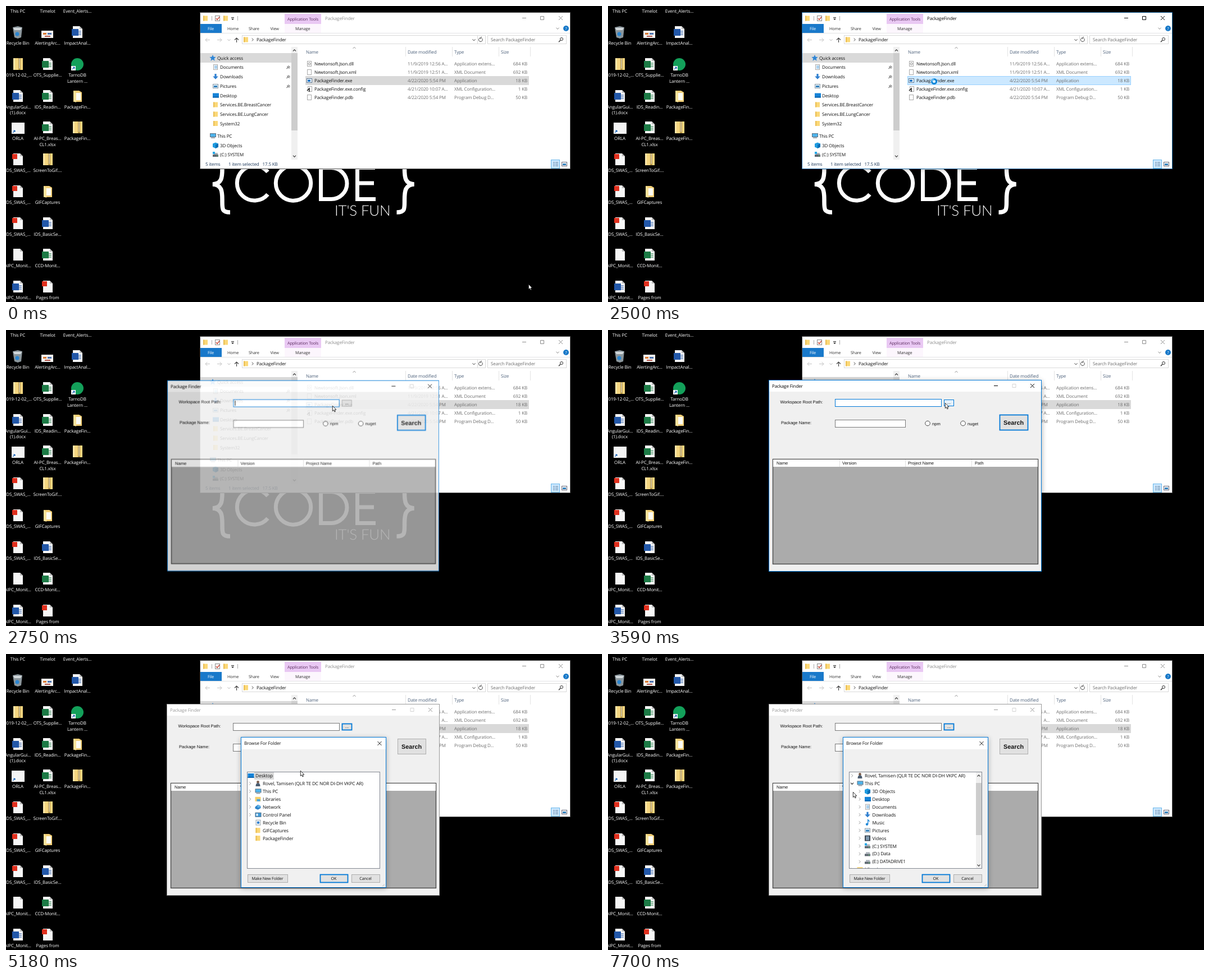
These frames come from a looping animation (1061x528 px, 8000 ms). An HTML page:

```html
<!DOCTYPE html>
<html lang="en">
<head>
<meta charset="utf-8">
<title>Package Finder</title>
<style>
html, body { margin: 0; width: 100%; height: 100%; overflow: hidden; background: #000; }
svg { display: block; }
text { font: 8px "Open Sans", "Noto Sans", sans-serif; letter-spacing: -.12px; white-space: pre; text-rendering: geometricPrecision; }
.rib { font-size: 7.3px; letter-spacing: -.15px; }
.tree { font-size: 8.25px; }
.ms { font: 7.6px "Liberation Sans", Arial, sans-serif; letter-spacing: 0; }
.btn { font-size: 7.2px; }
.big { font: 700 10.8px "Liberation Sans", Arial, sans-serif; letter-spacing: 0; }
.fun { font: 300 26px Lato, sans-serif; letter-spacing: -.2px; }
.mid { text-anchor: middle; }
.end { text-anchor: end; }
.shade { filter: blur(5px); }
.finder { transform-origin: 529px 260px; }
.dialog { transform-origin: 547px 283px; }
.spin { transform-box: fill-box; transform-origin: center; animation: spin 1s steps(14) infinite; }
@keyframes spin { to { transform: rotate(360deg); } }
</style>
</head>
<body>
<svg id="stage" width="1061" height="528" viewBox="0 0 1061 528"></svg>
<script>
const LOOP = 8000, BLUE = '#0078d7';

// Drawing helpers, all returning SVG markup
const rect = (x, y, w, h, fill, more = '') =>
  `<rect x="${x}" y="${y}" width="${w}" height="${h}" fill="${fill}" ${more}/>`;
const box = (x, y, w, h, fill, stroke, more = '') =>
  rect(x + .5, y + .5, w - 1, h - 1, fill, `stroke="${stroke}" ${more}`);
const line = (d, stroke = '#444', w = 1, more = '') =>
  `<path d="${d}" fill="none" stroke="${stroke}" stroke-width="${w}" ${more}/>`;
const shape = (d, fill) => `<path d="${d}" fill="${fill}"/>`;
const disc = (x, y, r, fill, more = '') => `<circle cx="${x}" cy="${y}" r="${r}" fill="${fill}" ${more}/>`;
const text = (x, y, s, fill = '#111', cls = '') =>
  `<text x="${x}" y="${y + 3}" fill="${fill}" class="${cls}">${s}</text>`;
const group = (cls, ...parts) => `<g class="${cls}">${parts.join('')}</g>`;
const chevron = (x, y, dir, color = '#444', w = 1) => line({
  up: `M${x - 2.5} ${y + 1.5}l2.5 -2.7 2.5 2.7`,
  down: `M${x - 2.5} ${y - 1.3}l2.5 2.7 2.5 -2.7`,
  right: `M${x - 1.3} ${y - 2.5}l2.7 2.5 -2.7 2.5`
}[dir], color, w);

// Small icons, centred on x,y
const mini = {
  folder: (x, y) => rect(x - 4, y - 4.5, 8, 9, '#fbd878') + rect(x - 4, y - 4.5, 2, 9, '#e9bd52'),
  page: (x, y) => box(x - 4, y - 5, 8, 10, '#fff', '#a9a9a9'),
  doc: (x, y) => mini.page(x, y) + line(`M${x - 2} ${y - 2}h5m-5 2h5m-5 2h5`, '#4b9bd8', .9),
  down: (x, y) => shape(`M${x - 1.6} ${y - 5}h3.2v4.5h3.2l-4.8 5.3 -4.8 -5.3h3.2z`, '#2f7fd0'),
  picture: (x, y) => box(x - 5, y - 4, 10, 8, '#dff0fb', '#8a98a5') + rect(x - 3, y - 1, 6, 3, '#2e7cb8'),
  desktop: (x, y) => rect(x - 5, y - 4, 11, 8, '#1583d8') + rect(x - 5, y + 2, 11, 2, '#0f67b0'),
  pc: (x, y) => box(x - 5, y - 4.5, 11, 7, '#4fb4ec', '#5b6f80') + rect(x - 3, y + 3, 7, 1.5, '#8a98a5'),
  cube: (x, y) => shape(`M${x} ${y - 5}l5 2v6l-5 2.5 -5 -2.5v-6z`, '#1e9be0') + shape(`M${x} ${y - 1}l5 -2v6l-5 2.5z`, '#0a6fb5'),
  drive: (x, y) => rect(x - 5, y, 10, 4, '#5d6670') + rect(x - 3, y - 3, 7, 3, '#aab2ba') + rect(x + 2, y + 1.5, 2, 1, '#6fe07a'),
  system: (x, y) => mini.drive(x, y) + rect(x - 5, y - 5, 4, 4, '#24a8e8'),
  music: (x, y) => disc(x - 1, y + 3, 2.2, '#1e88d8') + line(`M${x + .7} ${y + 3}v-8l3 3`, '#1e88d8', 1.4),
  video: (x, y) => rect(x - 5, y - 5, 10, 10, '#3c4650') + rect(x - 3, y - 3.5, 6, 7, '#7e97ad'),
  person: (x, y) => disc(x, y - 2.5, 2.4, '#7a5c4a') + shape(`M${x - 4} ${y + 5}q0 -6 4 -6t4 6z`, '#4c5d70'),
  library: (x, y) => rect(x - 5, y - 4, 10, 8, '#f4cf6c') + rect(x - 2, y, 6, 4, '#4ca5dc'),
  network: (x, y) => shape(`M${x - 5} ${y}l5 -4 5 3v3l-5 3 -5 -2z`, '#2c83c9') + rect(x - 1, y - 3, 5, 4, '#63b4e8'),
  control: (x, y) => box(x - 5, y - 4, 11, 8, '#3c9ad9', '#4c6b85') + rect(x - 3, y - 2, 3, 4, '#eaf6ff'),
  bin: (x, y) => box(x - 4, y - 5, 9, 10, '#eef3f6', '#9aa7b0') + disc(x + .5, y, 2.3, '#2f7fd0'),
  app: (x, y) => box(x - 5, y - 4, 10, 8, '#fff', '#5b7896') + rect(x - 3, y - 1.5, 5, 3.5, '#1b74c5'),
  dll: (x, y) => mini.page(x, y) + disc(x, y, 2, 'none', 'stroke="#888"'),
  config: (x, y) => mini.page(x + 1, y) + line(`M${x - 4} ${y + 3}l4 -4v6`, '#222', 1.5)
};

// Desktop icons, centred on x,y
const sheet = (x, y) => shape(`M${x - 8} ${y - 11}h12l5 5v16h-17z`, '#f6f6f6') + shape(`M${x + 4} ${y - 11}l5 5h-5z`, '#bdbdbd');
const office = color => (x, y) => sheet(x, y) + line(`M${x + 2} ${y - 2}h5m-5 3h5m-5 3h5`, color, 1) + rect(x - 10, y - 6, 12, 12, color);
const shortcut = (x, y) => rect(x - 11, y + 3, 8, 8, '#fff') + line(`M${x - 9} ${y + 9}l4 -4m-3 0h3v3`, '#1b63b5', 1.2);
const icons = {
  none: () => '',
  word: office('#2257a8'),
  excel: office('#1c7a45'),
  pdf: (x, y) => sheet(x, y) + rect(x - 10, y - 10, 9, 9, '#e0301e'),
  blank: sheet,
  folder: (x, y) => shape(`M${x - 7} ${y - 10}h10l5 3v17h-15z`, '#f2cf77') + rect(x - 2, y - 6, 8, 13, '#fbfbf4') + shape(`M${x - 7} ${y - 10}l5 4v17l-5 -2z`, '#fbe29a'),
  zip: (x, y) => rect(x - 8, y - 11, 17, 21, '#f5d680') + rect(x - 8, y - 11, 3, 21, '#fbe6a8') + rect(x + 1, y - 11, 4, 21, '#b99a4c') + line(`M${x + 3} ${y - 10}v18`, '#eee', 2, 'stroke-dasharray="1 1"'),
  bin: (x, y) => shape(`M${x - 9} ${y - 9}l9 -2 8 2 -2 18 -6 2 -6 -2z`, '#8b969c') + shape(`M${x - 8} ${y - 8}h15l-2 4h-11z`, '#d3d9dc') + disc(x - 1, y + 3, 3.5, '#2a85d0'),
  thumb: (x, y) => rect(x - 11, y - 3, 21, 13, '#f5f3f0') + rect(x - 8, y + 1, 6, 3, '#d9772f') + rect(x, y + 1, 7, 3, '#4a72b0') + rect(x - 5, y + 6, 10, 2, '#b05248'),
  tile: (x, y) => rect(x - 11, y - 9, 23, 20, '#f4f4f4') + shortcut(x, y),
  disc: (x, y) => disc(x, y, 11, '#13a05a') + shortcut(x, y)
};

const columns = [
  [21, 'none:This PC', 'bin:Recycle Bin', 'zip:2019-12-02_...', 'word:AngularGui...|(1).docx', 'tile:ORLA', 'pdf:IDS_SWAS_...',
    'pdf:IDS_SWAS_...', 'pdf:IDS_SWAS_...', 'blank:AIPC_Monit...', 'word:AIPC_Monit...'],
  [74, 'none:Timelot', 'thumb:AlertingArc...', 'excel:OTS_Supplie...', 'excel:IDS_Readin...', 'excel:AI-PC_Breas...|CL1.xlsx', 'zip:ScreenToGif....',
    'folder:GIFCaptures', 'word:IDS_BasicSe...', 'excel:CCD-Monit...', 'pdf:Pages from'],
  [127, 'none:Event_Alerts...', 'word:ImpactAnal...', 'disc:TarnoDB|Lantern ...', 'folder:PackageFin...', 'zip:PackageFin...']
];
const desktop = columns.map(([x, ...items]) => items.map((item, i) => {
  const [kind, label] = item.split(':'), y = 9.3 + i * 56.75;
  return icons[kind](x, Math.round(y - 19)) +
    label.split('|').map((s, n) => text(x, y + n * 10.8, s, '#fff', 'mid')).join('');
}).join('')).join('');

const brace = 'M399 267C384 267 385 275 385 290C385 306 384 317 368 318C384 319 385 330 385 346C385 362 384 368 399 368';
const wallpaper = group('wall',
  line(brace, '#fff', 7.5),
  line(brace, '#fff', 7.5, 'transform="translate(1094.5 0) scale(-1 1)"'),
  line('M466 296A31 31 0 1 0 466 336', '#fff', 7),
  disc(511.5, 316, 31.2, 'none', 'stroke="#fff" stroke-width="7"'),
  line('M560.5 288.5H579A28 28 0 0 1 579 344.5H560.5Z', '#fff', 7),
  line('M657 288.5H625.5V344.5H658M625.5 316H655', '#fff', 7),
  text(585, 371, "IT'S FUN", '#fff', 'fun'));

const winButtons = (xs, y, cls, midColor) =>
  line(`M${xs[0] - 3.5} ${y}h7`, '#8c8c8c', 1, `class="${cls}"`) +
  line(`M${xs[1] - 3} ${y - 3}h6v6h-6z`, midColor || '#8c8c8c', 1, midColor ? '' : `class="${cls}"`) +
  line(`M${xs[2] - 3.5} ${y - 3.5}l7 7m0 -7l-7 7`, '#8c8c8c', 1, `class="${cls}"`);

// File explorer
const nav = [[109, 'doc', 'Documents'], [126, 'down', 'Downloads'], [143, 'picture', 'Pictures'], [159.5, 'desktop', 'Desktop'],
  [176, 'folder', 'Services.BE.BreastCancer'], [193, 'folder', 'Services.BE.LungCancer'], [209.5, 'folder', 'System32'],
  [248.5, 'cube', '3D Objects'], [265, 'system', '(C:) SYSTEM']];
const files = [['dll', 'Newtonsoft.Json.dll', '11/9/2019 12:56 A...', 'Application extens...', 684],
  ['page', 'Newtonsoft.Json.xml', '11/9/2019 12:51 A...', 'XML Document', 692],
  ['app', 'PackageFinder.exe', '4/22/2020 5:54 PM', 'Application', 18],
  ['config', 'PackageFinder.exe.config', '4/21/2020 10:07 A...', 'XML Configuration...', 1],
  ['page', 'PackageFinder.pdb', '4/22/2020 5:54 PM', 'Program Debug D...', 50]];
const pin = y => line(`M499.5 ${y + 3}l2.5 -2.5m-1.5 -2l4 4m-2 -5l3 3`, '#777', 1.2);

const explorer = group('explorer',
  rect(345, 13, 660, 278, '#000', 'class="shade expShade"'),
  box(345, 11, 660, 280, '#fff', '#4a4a4a', 'class="expEdge"'),
  mini.folder(355, 22), mini.folder(391, 22),
  line('M366.5 18v8M412.5 18v8', '#aaa'),
  box(372, 17, 9, 10, '#fff', '#888'), line('M374 22l2 2.5 4 -5', '#c8402f', 1.3),
  line('M401 20.5h5', '#222'), shape('M401 22.5h5l-2.5 2.5z', '#222'),
  rect(496, 14, 65, 18, '#e9c8f3'), rect(496, 32, 65, 16, '#fcf6fd'),
  text(501, 23, 'Application Tools', '#5c2d60', 'rib'),
  text(568, 22, 'PackageFinder', '#8c8c8c', 'expTitle'),
  winButtons([922.5, 954.5, 987.5], 21.5, 'expBtn'),
  rect(346, 32, 38, 16, '#1979ca'), text(359, 40, 'File', '#fff', 'rib'),
  ...[[394, 'Home'], [432, 'Share'], [470.5, 'View'], [515, 'Manage']].map(([x, s]) => text(x, 40, s, '#333', 'rib')),
  line('M346 48.5H1004', '#e2e3e4'),
  chevron(982, 40, 'down', '#888'), disc(997, 40, 5, '#1477c8'), text(997, 40, '?', '#fff', 'rib mid'),
  line('M363 60.5h-8m3.5 -3.5l-3.5 3.5 3.5 3.5M376 60.5h8m-3.5 -3.5l3.5 3.5 -3.5 3.5', '#c4c4c4'),
  chevron(397, 60.5, 'down', '#bbb'), line('M410.5 65v-8m-3.5 3.5l3.5 -3.5 3.5 3.5', '#444', 1.2),
  box(420, 52, 434, 16, '#fff', '#d9d9d9'), mini.folder(427, 60), chevron(439, 60, 'right', '#555'),
  text(446, 60, 'PackageFinder'), chevron(833, 60.5, 'down'), line('M839.5 53v14', '#d9d9d9'),
  line('M847.5 58a3.4 3.4 0 1 1 -3 -1.2m1.5 -2.2v3h-3', '#444'),
  box(857, 52, 141, 16, '#fff', '#d9d9d9'), text(863, 60, 'Search PackageFinder', '#6d6d6d'),
  disc(989, 59, 2.5, 'none', 'stroke="#333"'), line('M987 61l-3 3.2', '#333', 1.3),

  rect(346, 84, 162, 17, '#d9d9d9'),
  shape('M368 87l1.6 3.8 4 .3 -3 2.6 1 4 -3.6 -2.2 -3.6 2.2 1 -4 -3 -2.6 4 -.3z', '#2f86d6'),
  text(376, 92.5, 'Quick access'),
  ...nav.map(([y, kind, s]) => mini[kind](373, y) + text(381, y, s)),
  pin(109), pin(126), pin(143),
  mini.pc(368, 231.5), text(376, 231.5, 'This PC'),
  rect(508, 73, 11, 201, '#f0f0f0'), rect(508, 84, 11, 138, '#cdcdcd'),
  chevron(513.5, 79, 'up', '#444', 1.2), chevron(513.5, 268, 'down', '#444', 1.2),

  line('M711.5 73v17M794.5 73v17M877.5 73v17M933.5 73v17', '#e3e3e3'), chevron(620, 74.5, 'up', '#888', .9),
  ...[[534, 'Name'], [715, 'Date modified'], [798, 'Type'], [881, 'Size']].map(([x, s]) => text(x, 82, s, '#4c607a')),
  box(533, 125, 398, 16, '#d9d9d9', '#d9d9d9', 'class="row"'),
  ...files.map(([kind, name, date, type, size], i) => {
    const y = 103 + i * 15;
    return mini[kind](540, y) + text(549, y, name) + text(715, y, date, '#6d6d6d') +
      text(798, y, type, '#6d6d6d') + text(928, y, size + ' KB', '#6d6d6d', 'end');
  }),
  text(355, 282, '5 items', '#1e395b'), text(396, 282, '1 item selected', '#1e395b'), text(456.5, 282, '17.5 KB', '#1e395b'),
  box(970, 274, 16, 16, '#cce8ff', '#66b5ea'), line('M974 279h3m1 0h5m-9 3h3m1 0h5m-9 3h3m1 0h5', '#5b7896'),
  box(989, 278, 10, 8, '#fff', '#667'), rect(991, 281, 6, 3, '#2e7cb8'));

// Package Finder window
const field = (x, y, w, cls = '') => box(x, y, w, 14, '#fff', '#7a7a7a', `class="${cls}"`);
const radio = (x, s) => disc(x, 166.5, 4.3, '#fff', 'stroke="#444"') + text(x + 8, 166.5, s, '#111', 'ms');
const finder = group('finder',
  rect(286, 91, 486, 340, '#000', 'class="shade finShade"'),
  box(286, 89, 486, 342, '#f0f0f0', BLUE, 'class="finEdge"'),
  rect(287, 90, 484, 20, '#fff'),
  text(292, 100, 'Package Finder', '#000', 'finTitle'),
  winButtons([690.5, 723, 755.5], 99.5, 'finBtn', '#d4d4d4'),
  text(306.5, 127.5, 'Workspace Root Path:', '#111', 'ms'), field(404, 123, 190, 'root'),
  line('M407.5 125.5v9', '#000', 1, 'class="caret"'),
  box(598, 124, 18, 12, '#e1e1e1', '#adadad', 'class="pick"'), text(607, 129, '...', '#111', 'ms mid'),
  text(308, 164.5, 'Package Name:', '#111', 'ms'), field(404, 160, 126),
  radio(569, 'npm'), radio(632, 'nuget'),
  box(697, 151, 51, 28, '#e1e1e1', BLUE, 'class="search"'), text(722, 165.7, 'Search', '#111', 'big mid'),
  box(293, 230, 473, 188, '#ababab', '#4a4a4a', 'stroke-width="1.4"'), rect(294, 231, 471, 13, '#fff'),
  line('M412.5 231v13M529.5 231v13M647.5 231v13', '#dedede'),
  ...[[300, 'Name'], [417, 'Version'], [534, 'Project Name'], [653, 'Path']].map(([x, s]) => text(x, 237.3, s, '#111', 'ms')));

// Folder dialog
const ROW = 13.95;
const node = (x, row, kind, s, arrow) => {
  const y = 217 + row * ROW;
  return (arrow ? chevron(x - 14, y, 'right', '#9a9a9a') : '') + mini[kind](x, y) + text(x + 8.5, y, s, '#111', 'tree');
};
const kids = [['cube', '3D Objects'], ['desktop', 'Desktop'], ['doc', 'Documents'], ['down', 'Downloads'], ['music', 'Music'],
  ['picture', 'Pictures'], ['video', 'Videos'], ['system', '(C:) SYSTEM'], ['drive', '(D:) Data'], ['drive', '(E:) DATADRIVE1']];
const rest = [['library', 'Libraries', 1], ['network', 'Network', 1], ['control', 'Control Panel', 1],
  ['bin', 'Recycle Bin'], ['folder', 'GIFCaptures'], ['folder', 'PackageFinder']];
const tree = group('scroll',
  rect(442, 211, 35, 13, '#d9d9d9'), node(435.5, 0, 'desktop', 'Desktop'),
  node(448.5, 1, 'person', 'Rovel, Tamisen (QLR TE DC NOR DI-DH VKPC AR)', 1),
  node(448.5, 2, 'pc', 'This PC'),
  group('closed', chevron(434.5, 217 + 2 * ROW, 'right', '#9a9a9a')),
  group('open', chevron(434.5, 217 + 2 * ROW, 'down', '#333', 1.2),
    ...kids.map(([kind, s], i) => node(462, 3 + i, kind, s, 1))),
  group('rest', ...rest.map(([kind, s, arrow], i) => node(448.5, 3 + i, kind, s, arrow))));
const button = (x, w, s, stroke, sw = 1) =>
  box(x, 393, w, 15, '#e1e1e1', stroke, `stroke-width="${sw}"`) + text(x + w / 2 - .5, 400.3, s, '#111', 'btn mid');
const dialog = group('dialog',
  rect(418, 150, 259, 268, '#000', 'class="shade" opacity=".3"'),
  box(418, 148, 259, 269, '#f0f0f0', BLUE), rect(419, 149, 257, 21, '#fff'),
  text(424, 159, 'Browse For Folder'), line('M661.5 156l7 7m0 -7l-7 7', '#111'),
  box(429, 210, 237, 173, '#fff', '#828790'),
  `<clipPath id="pane">${rect(430, 211, 235, 171, '#fff')}</clipPath><g clip-path="url(#pane)">${tree}</g>`,
  group('open', rect(655, 211, 10, 171, '#f0f0f0'), rect(655, 230, 10, 93, '#cdcdcd', 'class="thumb"'),
    chevron(660, 217, 'up', '#444', 1.2), chevron(660, 377, 'down', '#444', 1.2)),
  button(430, 72, 'Make New Folder', '#adadad'), button(559, 50, 'OK', BLUE, 1.8), button(615, 51, 'Cancel', '#adadad'),
  line('M670 414.5l4 -4m-1 4l1 -1', '#b5b5b5'));

// Pointer and busy rings
const ring = (cls, x, y, r, w) => group(cls,
  disc(x, y, r, '#d8eefb', `stroke="#0d86da" stroke-width="${w}"`),
  disc(x, y, r, 'none', `class="spin" stroke="#7cc8f6" stroke-width="${w * .6}" stroke-dasharray="${r * 1.5} 99"`));
const pointer = group('move', group('arrow',
  `<path d="M.3 .3V9.6L2.4 7.6 3.9 11 5.4 10.3 4 7.1H6.8Z" fill="#fff" stroke="#000" stroke-width=".8"/>`));

// Each key is [ms, value, steps until the next key]; one step holds the value
const rules = {};
let css = '';
function track(cls, prop, ...keys) {
  const name = `${cls}-${prop}`;
  const stops = [...keys, [LOOP, keys.at(-1)[1]]].map(([t, v, n = 1]) =>
    `${t / LOOP * 100}%{${prop}:${v};animation-timing-function:steps(${n})}`);
  css += `@keyframes ${name}{${stops.join('')}}\n`;
  (rules[cls] ??= []).push(`${name} ${LOOP}ms infinite`);
}
const span = (cls, from, to, on = 1) => track(cls, 'opacity', [0, 0], [from, on], [to, 0]);
const fadeIn = (cls, a, b, c) => {
  track(cls, 'opacity', [0, 0], [a, .45], [b, .88], [c, 1]);
  track(cls, 'transform', [0, 'scale(.98)'], [b, 'scale(.996)'], [c, 'scale(1)']);
};

const path = [[0, 930, 496], [70, 770, 384], [290, 744, 352, 5], [680, 480, 60, 4], [970, 581, 129], [1060, 580, 131],
  [1190, 580, 133], [2680, 581, 135], [2980, 556, 142], [3070, 535, 149], [3210, 548, 146, 3], [3440, 607, 131],
  [3590, 600, 130], [4350, 592, 138, 5], [4740, 540, 181, 6], [5180, 524, 208, 9], [5970, 470, 314], [6050, 462, 306],
  [6120, 450, 294], [6280, 447, 288, 10], [7000, 432, 242], [7150, 430, 243], [7230, 434, 243], [7450, 436, 246]];
track('move', 'transform', ...path.map(([t, x, y, n]) => [t, `translate(${x}px,${y}px)`, n]));
track('arrow', 'opacity', [0, 1], [2460, 0], [2680, 1]);
span('ringSmall', 1870, 2460);
span('ringBig', 2460, 2680);

track('expTitle', 'fill', [0, '#8c8c8c'], [1650, '#000'], [2680, '#8c8c8c']);
track('expBtn', 'stroke', [0, '#8c8c8c'], [1650, '#000'], [2680, '#8c8c8c']);
track('expEdge', 'stroke', [0, '#4a4a4a'], [1650, '#15639f'], [2680, '#4a4a4a']);
span('expShade', 1650, 2680, .35);
track('row', 'fill', [0, '#d9d9d9'], [970, '#cce8ff'], [2680, '#d9d9d9']);
track('row', 'stroke', [0, '#d9d9d9'], [970, '#99d1ff'], [2680, '#d9d9d9']);

fadeIn('finder', 2680, 2750, 2840);
track('finTitle', 'fill', [0, '#000'], [4420, '#999']);
track('finBtn', 'stroke', [0, '#000'], [4420, '#999']);
track('finEdge', 'stroke', [0, BLUE], [4420, '#999']);
span('finShade', 2840, 4420, .35);
span('caret', 2680, 3280);
track('root', 'stroke', [0, BLUE], [3870, '#7a7a7a']);
track('search', 'stroke', [0, BLUE], [3870, '#adadad']);
track('search', 'stroke-width', [0, '1.8px'], [3870, '1px']);
track('pick', 'stroke', [0, '#adadad'], [3360, BLUE]);
track('pick', 'stroke-width', [0, '1px'], [3870, '1.8px']);
track('pick', 'fill', [0, '#e1e1e1'], [3360, '#e5f1fb'], [4350, '#e1e1e1']);

fadeIn('dialog', 4870, 4940, 5020);
track('open', 'opacity', [0, 0], [7370, 1]);
track('closed', 'opacity', [0, 1], [7370, 0]);
track('rest', 'transform', [0, 'translateY(0)'], [7370, `translateY(${kids.length * ROW}px)`]);
track('scroll', 'transform', [0, 'translateY(0)'], [7530, `translateY(${-ROW / 2}px)`], [7620, `translateY(${-ROW}px)`]);
track('thumb', 'transform', [0, 'translateY(-8px)'], [7530, 'translateY(-4px)'], [7620, 'translateY(0)']);

for (const cls in rules) css += `.${cls}{animation:${rules[cls].join(',')}}\n`;
document.head.appendChild(document.createElement('style')).textContent = css;
document.getElementById('stage').innerHTML = wallpaper + desktop + explorer + finder + dialog + pointer +
  ring('ringSmall', 588.5, 134.5, 3.2, 2) + ring('ringBig', 580.5, 134.5, 4.1, 3);
</script>
</body>
</html>
```
